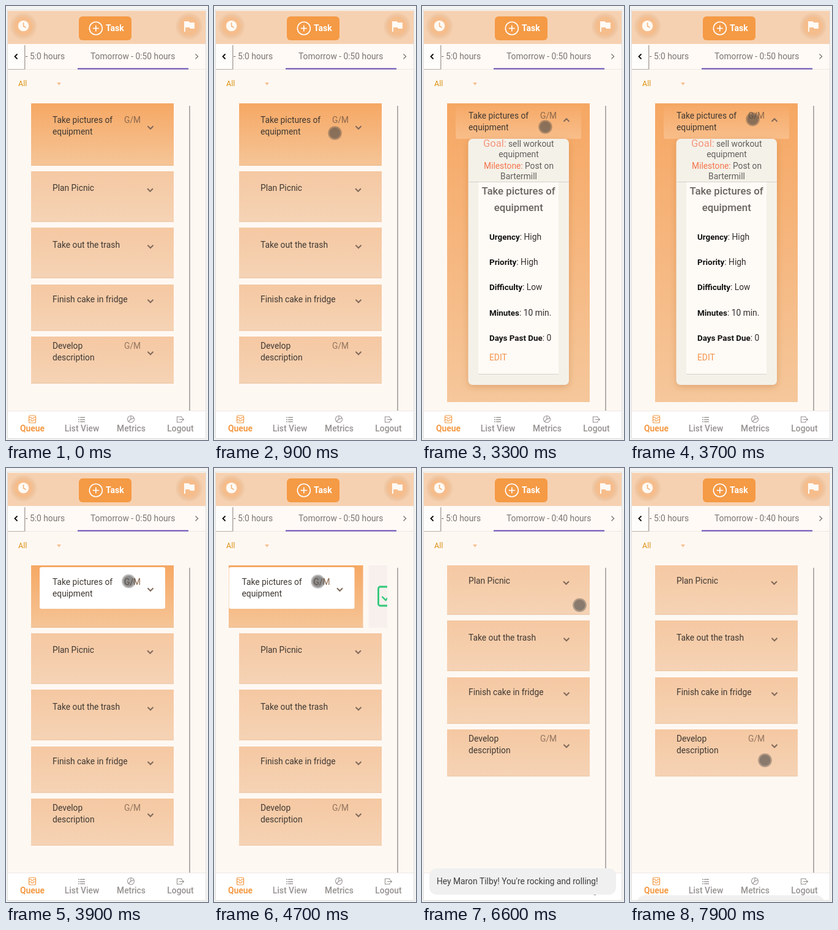
Animation, 330 px wide and 709 px high, one loop 8000 ms. Source, as an HTML page with a canvas:

```html
<!DOCTYPE html>
<html lang="en">
<head>
<meta charset="utf-8">
<title>Task queue</title>
<style>
  html, body { margin: 0; width: 100%; height: 100%; overflow: hidden; background: #f3f3f3; }
  canvas { display: block; width: 330px; height: 709px; }
</style>
</head>
<body>
<canvas id="stage"></canvas>
<script>
const W = 330, H = 709, LOOP = 8000, STEP = 100;
const canvas = document.getElementById('stage');
const ratio = window.devicePixelRatio || 1;
canvas.width = W * ratio;
canvas.height = H * ratio;
const ctx = canvas.getContext('2d');
ctx.scale(ratio, ratio);

const ORANGE = '#f59a45', INK = '#3f3832', GREY = '#969290';

// Pointer track: time, x, y
const TRACK = [
  [200, 27, 4], [900, 197.5, 207.5], [3200, 197.5, 207.5], [3300, 201.5, 197.5], [3500, 200.5, 185],
  [4400, 200.5, 185], [5000, 139, 186], [5100, 139, 186], [5300, 202, 210],
  [5400, 202, 210], [5500, 259.5, 224.5], [6500, 259.5, 224.5], [6600, 257.5, 224],
  [6700, 257.5, 224], [6900, 250, 304], [7000, 250, 304], [7400, 209, 500],
  [7600, 209, 500], [7900, 220.5, 477.5]
];

const TASKS = [
  { y: 270, h: 83, lines: ['Plan Picnic'], base: 32, arrow: 30.5, x: 235.5 },
  { y: 362, h: 83, lines: ['Take out the trash'], base: 33, arrow: 31, x: 236 },
  { y: 455, h: 76, lines: ['Finish cake in fridge'], base: 29, arrow: 27, x: 236 },
  { y: 540, h: 77, lines: ['Develop', 'description'], base: 20, arrow: 27, x: 236, goal: true }
];

const DETAILS = [['Urgency', 'High'], ['Priority', 'High'], ['Difficulty', 'Low'],
  ['Minutes', '10 min.'], ['Days Past Due', '0']];

const clamp = v => Math.max(0, Math.min(1, v));
const span = (t, a, b) => clamp((t - a) / (b - a));
const mix = (a, b, p) => a + (b - a) * p;

function rect(x, y, w, h, fill) {
  ctx.fillStyle = fill;
  ctx.fillRect(x, y, w, h);
}

function roundPath(x, y, w, h, r) {
  ctx.beginPath();
  ctx.roundRect(x, y, w, h, r);
}

function rounded(x, y, w, h, r, fill) {
  roundPath(x, y, w, h, r);
  ctx.fillStyle = fill;
  ctx.fill();
}

function disc(x, y, r, fill) {
  ctx.beginPath();
  ctx.arc(x, y, r, 0, Math.PI * 2);
  ctx.fillStyle = fill;
  ctx.fill();
}

function ring(x, y, r, color, width) {
  ctx.beginPath();
  ctx.arc(x, y, r, 0, Math.PI * 2);
  ctx.strokeStyle = color;
  ctx.lineWidth = width;
  ctx.stroke();
}

function line(points, color, width) {
  ctx.beginPath();
  points.forEach(([x, y]) => ctx.lineTo(x, y));
  ctx.strokeStyle = color;
  ctx.lineWidth = width;
  ctx.stroke();
}

function poly(points, fill) {
  ctx.beginPath();
  points.forEach(([x, y]) => ctx.lineTo(x, y));
  ctx.fillStyle = fill;
  ctx.fill();
}

function text(str, x, y, color = INK, size = 13.8, weight = 400, align = 'left') {
  ctx.font = `${weight} ${size}px Roboto, sans-serif`;
  ctx.textAlign = align;
  ctx.fillStyle = color;
  ctx.fillText(str, x, y);
  return x + ctx.measureText(str).width;
}

function shade(y, h, top, bottom) {
  const g = ctx.createLinearGradient(0, y, 0, y + h);
  g.addColorStop(0, top);
  g.addColorStop(1, bottom);
  return g;
}

function clipped(x, y, w, h, draw) {
  ctx.save();
  ctx.beginPath();
  ctx.rect(x, y, w, h);
  ctx.clip();
  draw();
  ctx.restore();
}

function chevron(x, y, dir = 1) {
  line([[x - 4.5, y - 2.3 * dir], [x, y + 2.3 * dir], [x + 4.5, y - 2.3 * dir]], '#806a5b', 2);
}

function halo(x, y) {
  const g = ctx.createRadialGradient(x, y, 14, x, y, 23);
  g.addColorStop(0, '#f6bd8c');
  g.addColorStop(.35, 'rgba(236,190,150,.7)');
  g.addColorStop(1, 'rgba(230,185,145,0)');
  disc(x, y, 23, g);
}

function header() {
  rect(3, 8, 323, 54, '#f6d1b1');
  halo(28.5, 33);
  disc(28.5, 32.5, 8.7, '#fffaf5');
  line([[28.5, 27], [28.5, 33], [32.5, 35.2]], '#f6b57e', 1.6);
  halo(299, 33);
  poly([[291, 25], [299, 25], [300, 27], [308, 27], [308, 37], [301, 37], [300, 35],
    [293, 35], [293, 42], [291, 42]], '#fffaf5');
  rounded(119, 17, 86, 39, 6, ORANGE);
  ring(146.8, 36.5, 10.5, '#fff', 1.6);
  line([[141.8, 36.5], [151.8, 36.5]], '#fff', 1.6);
  line([[146.8, 31.5], [146.8, 41.5]], '#fff', 1.6);
  text('Task', 163, 41, '#fff', 14, 700);
}

function tabs(done) {
  rect(3, 62, 323, 41, '#fffaf6');
  rect(3, 103, 323, 1, '#eee6e1');
  text('- 5:0 hours', 31.7, 87, '#7b7572');
  text(`Tomorrow - 0:${done ? 40 : 50} hours`, 138, 87, '#7b7572');
  rect(117, 101.5, 181, 2, '#6a4bb5');
  rect(3, 63, 27, 40, '#fffdfb');
  rect(30, 64, 1, 39, '#a9a19c');
  rect(31, 64, 1, 39, '#ded7d2');
  rect(3, 103, 28, 1, '#b8aea8');
  line([[18.5, 78.5], [14.5, 82.5], [18.5, 86.5]], '#111', 1.9);
  line([[309.5, 78.5], [313.5, 82.5], [309.5, 86.5]], '#8a8583', 1.6);
  text('All', 20, 131, '#dc9518', 12.5);
  poly([[83, 125], [90, 125], [86.5, 129.5]], '#f6c08f');
}

function taskCard(task, dy) {
  const y = task.y + dy;
  rect(41, y, 233, task.h, shade(y, task.h, '#f5c8a2', '#f5d3b5'));
  rect(41, y + task.h - 2, 233, 2, '#f1ceaf');
  task.lines.forEach((s, i) => text(s, 76, y + task.base + i * 19));
  if (task.goal) text('G/M', 193, y + task.base, '#94755f');
  chevron(task.x, y + task.arrow);
}

function cardTitle(y) {
  text('Take pictures of', 76, y);
  text('equipment', 76, y + 19);
  text('G/M', 193, y, '#8c694d');
}

function firstCard(dx, white) {
  clipped(24, 159, 259, 103, () => {
    if (dx > 0) {
      const x = 283 - dx;
      rect(x, 159, 61, 102, '#f7f0ed');
      roundPath(x + 16, 194, 30, 31, 3);
      ctx.strokeStyle = '#30c878';
      ctx.lineWidth = 2.8;
      ctx.stroke();
      line([[x + 22, 210], [x + 28, 216], [x + 39, 203]], '#30c878', 2.4);
    }
    ctx.translate(-dx, 0);
    rect(41, 159, 233, 102, shade(159, 102, '#f6a864', '#f5c598'));
    rect(41, 259, 233, 2, '#f0c094');
    if (white > 0) {
      ctx.globalAlpha = white;
      rounded(55, 162, 205, 68, 3, '#fff');
      ctx.globalAlpha = 1;
    }
    cardTitle(191);
    chevron(236, 198.5);
  });
}

function detailPanel() {
  ctx.save();
  ctx.shadowColor = 'rgba(180,100,35,.35)';
  ctx.shadowBlur = 12 * ratio;
  ctx.shadowOffsetY = 3 * ratio;
  rounded(75.5, 217, 164.5, 402, 7, '#f4f1e9');
  ctx.restore();

  text('Goal:', 100, 230, '#f6957a', 16.6);
  text('sell workout', 141, 230, '#625e5b');
  text('equipment', 158, 247, '#625e5b', 13.8, 400, 'center');
  text('Milestone:', 101, 266, '#f4764c');
  text('Post on', 168, 266, '#625e5b');
  text('Bartermill', 158, 283, '#625e5b', 13.8, 400, 'center');

  rect(76, 287, 164, 1, '#d5d1ca');
  rect(92, 288, 131, 313, '#fefaf6');
  rect(92, 601, 131, 1, '#d8d3cb');
  text('Take pictures of', 157.7, 308, '#67645f', 16.8, 500, 'center');
  text('equipment', 157.7, 335, '#67645f', 16.8, 500, 'center');
  DETAILS.forEach(([label, value], i) => {
    const y = 382 + i * 41.2;
    const end = text(label, 110, y, '#111', 13.4, 700);
    text(`: ${value}`, end, y, '#332f2d', 13.8);
  });
  text('EDIT', 110, 579, '#f4924a', 13.8);
}

function openCard(open) {
  const h = mix(102, 488, open);
  clipped(41, 159, 233, h, () => {
    rect(41, 159, 233, h, shade(159, h, '#f6a763', '#f5c79b'));
    rounded(55, 163, 205, 54, 3, shade(163, 54, 'rgba(255,235,215,.03)', 'rgba(255,235,215,.3)'));
    cardTitle(184);
    chevron(236, 186.5, -1);
    detailPanel();
  });
}

function list(t, done) {
  const open = t < 3000 ? span(t, 1500, 1700) : 1 - span(t, 3700, 3900);
  const white = t >= 3900 ? 1 - span(t, 5100, 5300) : (t === 1500 || t === 3700 ? 1 : 0);
  const dx = 61 * span(t, 4400, 5000);
  clipped(3, 159, 290, 489, () => {
    if (!done) {
      if (open > 0) openCard(open);
      else firstCard(dx, white);
    }
    const dy = done ? -113 : open * 386;
    TASKS.forEach(task => taskCard(task, dy));
  });
  rect(299, 163, 2, 498, '#b3aeab');
}

function nav() {
  rect(3, 661, 323, 45, '#fff');
  rect(3, 661, 323, 1, '#eee8e4');

  roundPath(37.5, 669, 11, 12, 2);
  ctx.strokeStyle = ORANGE;
  ctx.lineWidth = 1.2;
  ctx.stroke();
  for (const y of [672, 676]) {
    line([[37, y], [41, y], [42, y + 2], [44, y + 2], [45, y], [49, y]], ORANGE, 1.2);
  }

  for (let y = 671.5; y < 681; y += 3.5) {
    rect(118, y, 2, 1.4, GREY);
    rect(121, y, 8, 1.4, GREY);
  }

  ring(204, 675, 5.5, GREY, 1.1);
  line([[204, 669.5], [204, 675], [200, 679]], GREY, 1.1);
  line([[204, 675], [209, 673]], GREY, 1.1);

  line([[287, 673], [287, 671], [279.5, 671], [279.5, 680], [287, 680], [287, 678]], GREY, 1.1);
  line([[283, 675.5], [290, 675.5]], GREY, 1.1);
  line([[288, 673.3], [290.5, 675.5], [288, 677.7]], GREY, 1.1);

  const label = (s, x, color, weight) => text(s, x, 695, color, 13.8, weight, 'center');
  label('Queue', 43, ORANGE, 700);
  label('List View', 124, GREY, 500);
  label('Metrics', 204.5, GREY, 500);
  label('Logout', 285, GREY, 500);
}

function toast(t) {
  if (t < 5500) return;
  const dy = t < 7000 ? 26 * (1 - span(t, 5500, 5700)) : 44 * span(t, 7600, 7900);
  rounded(12, 654 + dy, 305, 43, 12, '#f0f0f0');
  text("Hey Maron Tilby! You're rocking and rolling!", 24, 680 + dy, '#3d3d3d');
}

function pointer(t) {
  if (t < TRACK[0][0]) return;
  let i = 0;
  while (i < TRACK.length - 2 && t > TRACK[i + 1][0]) i++;
  const [t0, x0, y0] = TRACK[i], [t1, x1, y1] = TRACK[i + 1];
  const p = span(t, t0, t1);
  const x = mix(x0, x1, p), y = mix(y0, y1, p);
  disc(x, y, 11.3, 'rgba(66,66,66,.38)');
  disc(x, y, 9, 'rgba(66,66,66,.36)');
}

function draw(t) {
  const done = t >= 5800;
  rect(0, 0, W, H, '#f3f3f3');
  rect(2, 6, 325, 701, '#dedede');
  clipped(3, 7, 323, 699, () => {
    rect(3, 7, 323, 699, '#fef8f3');
    header();
    tabs(done);
    list(t, done);
    nav();
    toast(t);
  });
  pointer(t);
}

function frame(now) {
  draw(Math.floor((now % LOOP) / STEP) * STEP);
  requestAnimationFrame(frame);
}
requestAnimationFrame(frame);
</script>
</body>
</html>
```
